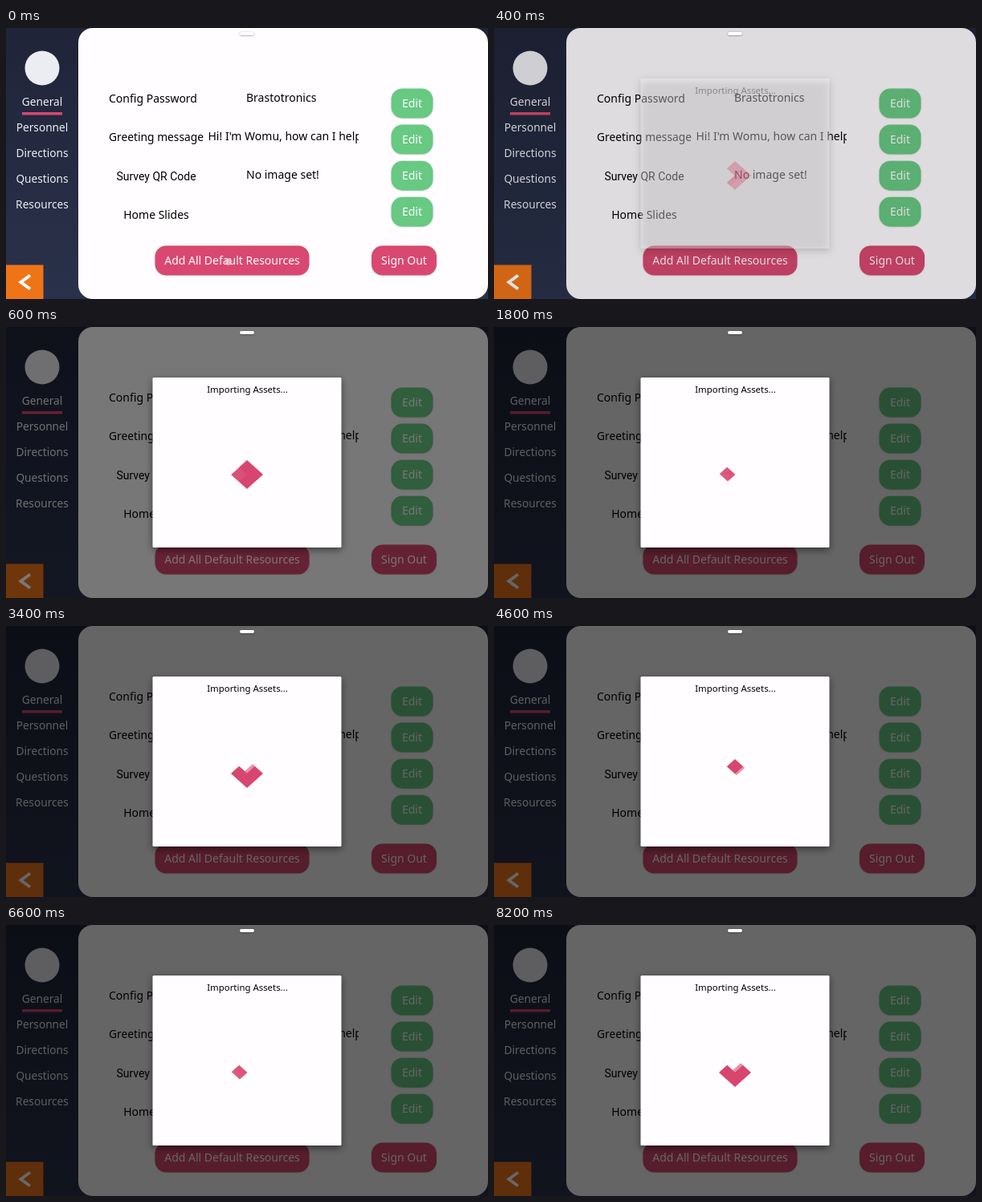
Write an HTML page with a canvas that moves like this. It is 600x338 px and loops after 8.3 s.

```html
<!DOCTYPE html>
<html lang="en">
<head>
<meta charset="utf-8">
<title>Settings import</title>
<style>
  html, body { margin: 0; width: 100%; height: 100%; overflow: hidden; background: #1c2032; }
  canvas { display: block; width: 600px; height: 338px; }
</style>
</head>
<body>
<canvas id="stage" width="600" height="338"></canvas>
<script>
const ctx = document.getElementById('stage').getContext('2d');
const LOOP = 8300, STEP = 100;
const FONT = '"Noto Sans", sans-serif';
const GREEN = '#68c983', PINK = '#d94870', ORANGE = '#ef7418', PAPER = '#fffdff', LIGHT = '#ecedf2';

const clamp = v => Math.max(0, Math.min(1, v));

function box(x, y, w, h, r, fill) {
  ctx.beginPath();
  ctx.roundRect(x, y, w, h, r);
  ctx.fillStyle = fill;
  ctx.fill();
}

function disc(x, y, r, fill) {
  ctx.beginPath();
  ctx.arc(x, y, r, 0, Math.PI * 2);
  ctx.fillStyle = fill;
  ctx.fill();
}

function label(str, x, y, fill, { size = 14, weight = 400, align = 'center', font = FONT } = {}) {
  ctx.font = `${weight} ${size}px ${font}`;
  ctx.textAlign = align;
  ctx.fillStyle = fill;
  ctx.fillText(str, x, y);
}

function withShadow(color, blur, dy, draw) {
  ctx.save();
  ctx.shadowColor = color;
  ctx.shadowBlur = blur;
  ctx.shadowOffsetY = dy;
  draw();
  ctx.restore();
}

function button(str, x, y, w, color) {
  withShadow('rgba(0,0,0,.15)', 2, 0.5, () => box(x, y, w, 37, 14, color));
  label(str, x + w / 2, y + 23.5, PAPER, { weight: 500 });
}

function sidebar() {
  const navy = ctx.createLinearGradient(0, 0, 0, 338);
  navy.addColorStop(0, '#1f2438');
  navy.addColorStop(1, '#2a324b');
  ctx.fillStyle = navy;
  ctx.fillRect(0, 0, 600, 338);

  disc(45, 50, 21.5, LIGHT);
  ['General', 'Personnel', 'Directions', 'Questions', 'Resources']
    .forEach((name, i) => label(name, 45, 97 + i * 32.1, LIGHT, { size: 13.7 }));
  box(20, 105, 50, 3.5, 0, PINK);

  box(0, 295.5, 46.5, 43, 0, ORANGE);
  ctx.beginPath();
  ctx.moveTo(30, 308.5);
  ctx.lineTo(18.5, 317);
  ctx.lineTo(30, 325.5);
  ctx.strokeStyle = '#fff';
  ctx.lineWidth = 4;
  ctx.stroke();
}

function panel() {
  box(90, 0, 510, 338, 18, PAPER);

  label('Config Password', 183, 93, '#000');
  label('Greeting message', 187, 141, '#000', { size: 13.8 });
  label('Survey QR Code', 187, 190, '#000', { font: 'Roboto, sans-serif' });
  label('Home Slides', 187, 238, '#000');

  label('Brastotronics', 299, 92, '#000', { align: 'left' });
  label('No image set!', 299, 188, '#000', { align: 'left' });
  ctx.save();
  ctx.beginPath();
  ctx.rect(250, 120, 189, 30);
  ctx.clip();
  label("Hi! I'm Womu, how can I help", 251.5, 140, '#000', { align: 'left' });
  ctx.restore();

  for (let i = 0; i < 4; i++) button('Edit', 479.5, 75.5 + i * 45.1, 52, GREEN);
  button('Add All Default Resources', 185.5, 271.5, 192, PINK);
  button('Sign Out', 455, 271.5, 81, PINK);
}

function touch(t) {
  disc(277, 291.5, 4.5, `rgba(240,215,225,${0.6 * clamp(1 - t / 300)})`);
}

// The scrim darkens the picture; the panel's black text is unaffected.
function scrim(t) {
  ctx.fillStyle = `rgba(0,0,0,${0.6 * clamp((t - 335) / 300)})`;
  ctx.fillRect(0, 0, 600, 338);
}

// Four squares unfold one after another, then fold away in the same order.
function foldingCube(t) {
  const side = 14.15;
  const clock = t - 75 * clamp((1400 - t) / 900);
  const baseAlpha = ctx.globalAlpha;
  for (let i = 0; i < 4; i++) {
    const raw = (clock - 1455) / 2400 - i / 8;
    const phase = raw - Math.floor(raw);
    const open = clamp((phase - 0.1) / 0.15);
    const close = clamp((phase - 0.75) / 0.15);
    const alpha = open * (1 - close);
    if (alpha <= 0) continue;
    ctx.save();
    ctx.translate(300, 184);
    ctx.scale(1, 0.9);
    ctx.rotate(Math.PI / 4 + i * Math.PI / 2);
    ctx.scale(Math.cos(Math.PI * close), Math.cos(Math.PI * (1 - open)));
    ctx.globalAlpha = baseAlpha * alpha;
    ctx.fillStyle = '#d8466f';
    ctx.fillRect(-side, -side, side + 0.3, side + 0.3);
    ctx.restore();
  }
}

function dialog(t) {
  const alpha = clamp((t - 340) / 172);
  if (!alpha) return;
  ctx.save();
  ctx.globalAlpha = alpha;
  withShadow('rgba(0,0,0,.5)', 10, 3, () => box(182.5, 63, 235, 212, 1.5, PAPER));
  label('Importing Assets...', 300.5, 82, '#000', { size: 11.4 });
  foldingCube(t);
  ctx.restore();
}

function render(t) {
  sidebar();
  panel();
  touch(t);
  scrim(t);
  withShadow('rgba(0,0,0,.45)', 2, 0.5, () => box(291, 5, 18, 4, 2, '#fff'));
  dialog(t);
}

function tick(now) {
  render(Math.floor((now % LOOP) / STEP) * STEP);
  requestAnimationFrame(tick);
}

render(0);
requestAnimationFrame(tick);
</script>
</body>
</html>
```
